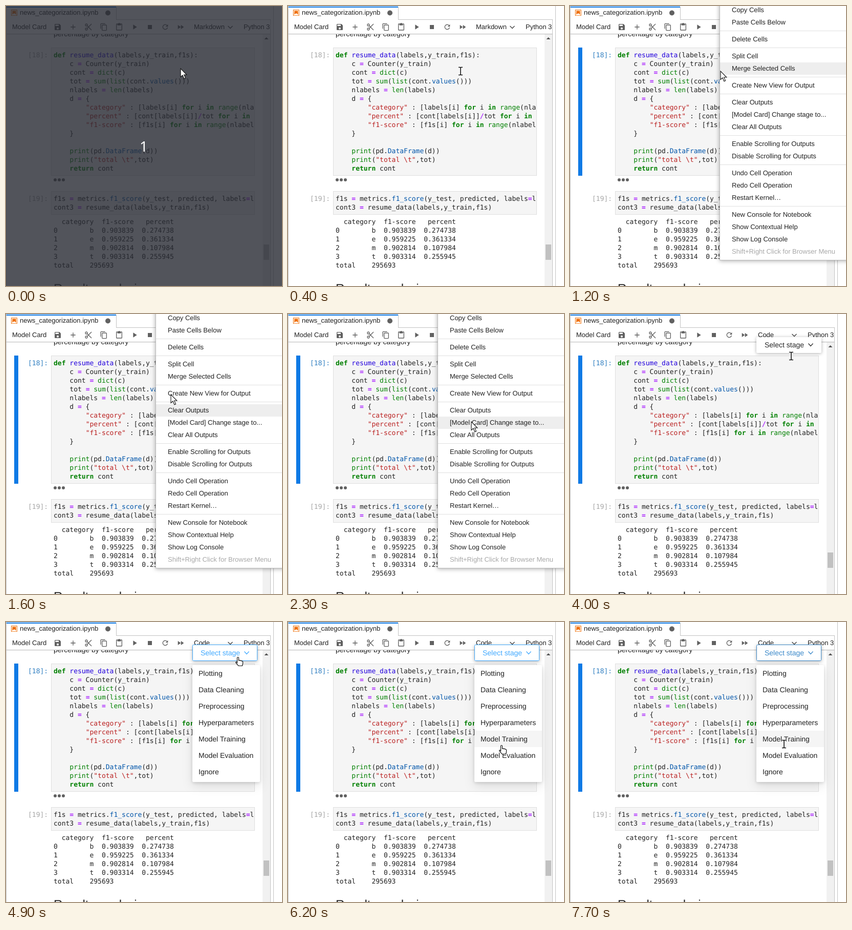
Write an HTML page that moves like this. It is 539 px wide and 546 px high and loops after 8 s.

```html
<!DOCTYPE html>
<html lang="en">
<head>
<meta charset="utf-8">
<title>Notebook cell stage</title>
<style>
html, body { margin: 0; width: 100%; height: 100%; overflow: hidden; background: #fff; }
svg { display: block; }
text { font: 13px "Liberation Sans", Arial, sans-serif; fill: #212121; white-space: pre; text-rendering: geometricPrecision; }
.mono text { font-family: "DejaVu Sans Mono", monospace; }
.big text, .md { font-size: 14px; }
.line { fill: #c2c2c2; }
.cell { fill: #f5f5f5; stroke: #dfdfdf; }
.icon { fill: #616161; }
.thin { fill: none; stroke: #616161; stroke-width: 2; }
.c0 { fill: #ba2121; }
.c1 { fill: #008000; font-weight: bold; }
.c2 { fill: #008000; }
.c3 { fill: #20d; }
.c4 { fill: #05a; }
.c5 { fill: #a2f; font-weight: bold; }
.mono .prompt { fill: #a6a6a6; }
.mono .active { fill: #307fc1; }
</style>
</head>
<body>
<svg id="stage" width="539" height="546" viewBox="0 0 539 546">
  <rect width="539" height="546" fill="#fff"/>

  <!-- notebook -->
  <text class="md" x="93" y="59">percentage by category</text>
  <rect id="bar" x="16" y="81" width="8" height="250" fill="#0f7ae5"/>
  <rect class="cell" x="88.5" y="81.5" width="397" height="249"/>
  <rect class="cell" x="88.5" y="361.5" width="397" height="45"/>
  <svg class="mono" id="code" width="485" height="546">
    <text class="prompt" id="prompt" x="43" y="100">[18]:</text>
    <text class="prompt" x="43" y="380">[19]:</text>
  </svg>
  <g class="icon"><circle cx="96" cy="339" r="3"/><circle cx="104" cy="339" r="3"/><circle cx="112" cy="339" r="3"/></g>
  <text x="93" y="558.5" style="font-size:24.2px">Results analysis</text>

  <!-- scrollbar -->
  <rect x="501" y="55" width="15" height="491" fill="#f1f1f1"/>
  <rect x="503" y="465" width="11" height="30" fill="#c1c1c1"/>
  <path d="M504.500 65l4-4 4 4z" fill="#505050"/>

  <!-- tab and toolbar -->
  <rect x="1" width="538" height="54" fill="#fff"/>
  <rect x="1" y="55" width="515" height="1" fill="#000" opacity=".06"/>
  <g class="line">
    <rect width="1" height="546"/>
    <rect x="215" y="2" width="1" height="25"/>
    <rect x="215" y="26" width="302" height="1"/>
    <rect y="54" width="517" height="1"/>
    <rect x="516" y="26" width="1" height="520"/>
    <rect x="522" width="1" height="546"/>
  </g>
  <rect x="1" y="1" width="214" height="2" fill="#0f7ae5"/>
  <g transform="translate(8.800 6) scale(.65)" fill="#ef6c00">
    <path d="M18.700 3.300v15.400H3.300V3.300zm1.500-1.500H1.800v18.300h18.400z" fill-rule="evenodd"/>
    <path d="M16.500 16.500l-5.400-4.300-5.600 4.300v-11h11z"/>
  </g>
  <text x="27" y="17">news_categorization.ipynb</text>
  <circle class="icon" cx="199" cy="13.500" r="5"/>
  <text x="12" y="45">Model Card</text>
  <g id="tools"></g>
  <text id="kind" x="367" y="44.500"></text>
  <path d="M433.500 39l4.500 4.500 4.500-4.500" fill="none" stroke="#424242" stroke-width="1.300"/>
  <text x="464" y="45">Python 3</text>

  <!-- context menu -->
  <g id="menu">
    <rect x="292.500" y="-20" width="300" height="515.500" fill="#fff" stroke="#bdbdbd" style="filter:drop-shadow(0 1px 4px rgba(0,0,0,.35))"/>
    <rect id="menuRow" x="293" width="246" height="24" fill="#eee"/>
  </g>

  <!-- stage picker -->
  <g id="drop" class="big">
    <rect x="364" y="84" width="132" height="228" rx="2" fill="#fff" style="filter:drop-shadow(0 2px 3px rgba(0,0,0,.14)) drop-shadow(0 7px 10px rgba(0,0,0,.1))"/>
    <rect id="dropRow" x="364" width="132" height="32" fill="#f5f5f5"/>
  </g>
  <g id="picker" class="big">
    <rect x="364" y="45" width="127" height="31" rx="2" fill="#fff" style="filter:drop-shadow(0 1px 3px rgba(0,0,0,.32))"/>
    <rect id="edge" x="364.500" y="44.500" width="126" height="31" rx="2" fill="#fff"/>
    <text id="label" x="380" y="65">Select stage</text>
    <path id="arrow" d="M465.500 57.500l4.500 5 4.500-5" fill="none" stroke-width="1.200"/>
  </g>

  <!-- countdown -->
  <g id="shade">
    <rect width="539" height="546" fill="rgb(39,42,51)" opacity=".8"/>
    <text x="269" y="284" text-anchor="middle" style="font:28px 'Noto Sans',sans-serif;fill:#fff">1</text>
  </g>

  <!-- pointers -->
  <path id="tip" d="M0 0v16.500l3.900-3.500 3 6.800 2.700-1.200-3-6.600h5.200z" fill="#fff" stroke="#111" stroke-width="1.100"/>
  <g id="beam" fill="none">
    <path d="M-4-7.500h3l1 1 1-1h3M0-6.500v13M-4 7.500h3l1-1 1 1h3" stroke="#fff" stroke-width="3.500"/>
    <path d="M-4-7.500h3l1 1 1-1h3M0-6.500v13M-4 7.500h3l1-1 1 1h3" stroke="#111" stroke-width="1.600"/>
  </g>
  <path id="hand" d="M-1.500 9V1a1.500 1.500 0 0 1 3 0v5q1.700-1 3 .5 1.600-.8 2.700.6 2-.3 2.300 1.400V12q0 2-1 3v1.500H1L-3.800 11q-1.200-1.800.3-2.200 1 0 2 1.600z" fill="#fff" stroke="#111" stroke-width="1.200"/>
</svg>
<script>
const $ = id => document.getElementById(id);
const add = (id, markup) => $(id).insertAdjacentHTML('beforeend', markup);
const text = (x, y, s, extra = '') => `<text x="${x}" y="${y}" ${extra}>${s}</text>`;
const clamp = v => Math.max(0, Math.min(1, v));
const show = (id, on) => $(id).style.display = on ? '' : 'none';

// Code and output
const syntax = /(".*?")|\b(def|for|in|return)\b|\b(dict|sum|list|len|range|print)\b|(?<=def )(\w+)|(?<=\.)(\w+)|([=\/])/g;
const paint = s => s.replace(syntax, (m, ...g) => `<tspan class="c${g.findIndex(Boolean)}">${m}</tspan>`);
const block = (y, s, style = v => v) =>
  s.split('\n').forEach((row, i) => add('code', text(93, y + 17 * i, style(row))));

block(100, String.raw`def resume_data(labels,y_train,f1s):
    c = Counter(y_train)
    cont = dict(c)
    tot = sum(list(cont.values()))
    nlabels = len(labels)
    d = {
        "category" : [labels[i] for i in range(nlabels)],
        "percent" : [cont[labels[i]]/tot for i in range(nlabels)],
        "f1-score" : [f1s[i] for i in range(nlabels)]
    }

    print(pd.DataFrame(d))
    print("total \t",tot)
    return cont`, paint);
block(380, `f1s = metrics.f1_score(y_test, predicted, labels=labels)
cont3 = resume_data(labels,y_train,f1s)`, paint);
block(425, `  category  f1-score   percent
0        b  0.903839  0.274738
1        e  0.959225  0.361334
2        m  0.902814  0.107984
3        t  0.903314  0.255945
total    295693`);

// Toolbar icons on a 24-unit grid
[
  '<path d="M17 3H5c-1.100 0-2 .9-2 2v14c0 1.100.9 2 2 2h14c1.100 0 2-.9 2-2V7zM12 19a3 3 0 1 1 0-6 3 3 0 0 1 0 6zM15 9H5V5h10z" fill-rule="evenodd"/>',
  '<path d="M19 13h-6v6h-2v-6H5v-2h6V5h2v6h6z"/>',
  '<path class="thin" d="M8 8l13 13M8 16L21 3"/><circle class="thin" cx="6" cy="6" r="3"/><circle class="thin" cx="6" cy="18" r="3"/>',
  '<path class="thin" d="M3 17V4q0-2 2-2h11M9 6h9q2 0 2 2v12q0 2-2 2H9q-2 0-2-2V8q0-2 2-2z"/>',
  '<path class="thin" d="M5 3h14q1 0 1 1v16q0 1-1 1H5q-1 0-1-1V4q0-1 1-1z"/><path d="M7 3h2a3 3 0 0 1 6 0h2v4H7z"/>',
  '<path d="M8 5v14l11-7z"/>',
  '<path d="M6 6h12v12H6z"/>',
  '<path class="thin" d="M17 7a7 7 0 1 0 1.700 6.500"/><path d="M20 4v7h-7z"/>',
  '<path d="M4 18l8.500-6L4 6zM13 6v12l8.500-6z"/>'
].forEach((d, i) => add('tools', `<g class="icon" transform="translate(${93 + 30 * i} 33) scale(.667)">${d}</g>`));

// Context menu: "-" is a separator
let y = 8;
for (const item of ['Copy Cells', 'Paste Cells Below', '-', 'Delete Cells', '-', 'Split Cell', 'Merge Selected Cells', '-',
  'Create New View for Output', '-', 'Clear Outputs', '[Model Card] Change stage to...', 'Clear All Outputs', '-',
  'Enable Scrolling for Outputs', 'Disable Scrolling for Outputs', '-', 'Undo Cell Operation', 'Redo Cell Operation',
  'Restart Kernel…', '-', 'New Console for Notebook', 'Show Contextual Help', 'Show Log Console',
  'Shift+Right Click for Browser Menu']) {
  if (item === '-') {
    add('menu', `<rect x="293" y="${y - 8}" width="246" height="1" fill="#e0e0e0"/>`);
    y += 9;
  } else {
    add('menu', text(316, y + 4, item, item.startsWith('Shift') ? 'style="fill:#a8a8a8"' : ''));
    y += 24;
  }
}

['Plotting', 'Data Cleaning', 'Preprocessing', 'Hyperparameters', 'Model Training', 'Model Evaluation', 'Ignore']
  .forEach((s, i) => add('drop', text(376, 105 + 32 * i, s)));

// Pointer path: time, x, y
const path = [
  [0, 341, 122], [399, 341, 122], [400, 337, 127], [500, 337, 127], [800, 294, 127], [1300, 294, 127],
  [1400, 297, 130], [1600, 322, 157], [1700, 338, 188], [1800, 338, 188], [1900, 351, 234], [2000, 357, 240],
  [2100, 360, 231], [2200, 360, 231], [2300, 358, 210], [3300, 358, 210], [3400, 353, 209], [3600, 351, 190],
  [3800, 392, 135], [4000, 432, 82], [4200, 436, 66], [4300, 436, 66], [5200, 462, 70], [5400, 480, 92],
  [5600, 472, 135], [5900, 432, 215], [6100, 417, 242], [6200, 417, 241], [6500, 417, 241], [6600, 417, 242],
  [6700, 417, 242], [6800, 417, 241], [7200, 417, 241], [7400, 418, 238], [8000, 418, 238]
];
function pointer(t) {
  const i = path.findIndex(k => k[0] > t);
  const [t0, x0, y0] = path[i - 1], [t1, x1, y1] = path[i];
  const p = (t - t0) / (t1 - t0);
  return [x0 + (x1 - x0) * p, y0 + (y1 - y0) * p];
}

function draw(t) {
  const [px, py] = pointer(t);
  const picked = t >= 1100;
  const menu = picked && t < 3100;
  const shape = t < 400 || menu ? 'tip' : t >= 4200 && t < 7400 ? 'hand' : 'beam';

  show('shade', t < 400);
  show('bar', picked);
  $('prompt').classList.toggle('active', picked);
  $('kind').textContent = picked ? 'Code' : 'Markdown';

  show('menu', menu);
  $('menuRow').setAttribute('y', t < 1400 ? 110 : t < 1600 ? 143 : t < 1700 ? 176 : t < 2100 ? 224 : 200);

  show('picker', t >= 3100);
  const blue = clamp((t - 4100) / 300) - .25 * clamp((t - 7300) / 400);
  const color = `rgb(${[64, 169, 255].map(c => 38 + (c - 38) * blue)})`;
  $('label').style.fill = color;
  $('arrow').style.stroke = color;
  $('edge').style.stroke = color;
  $('edge').style.opacity = clamp(blue * 1.3);

  const open = clamp((t - 4300) / 300);
  show('drop', open > 0);
  $('drop').style.opacity = open;
  $('drop').setAttribute('transform', `translate(0 84) scale(1 ${.8 + .2 * open}) translate(0 -84)`);
  show('dropRow', py >= 84);
  $('dropRow').setAttribute('y', 84 + 32 * Math.floor((py - 84) / 32));

  for (const id of ['tip', 'beam', 'hand']) show(id, id === shape);
  $(shape).setAttribute('transform', `translate(${Math.round(px)} ${Math.round(py)})`);
}

function tick() {
  draw(Math.floor(performance.now() % 8000 / 100) * 100);
  requestAnimationFrame(tick);
}
tick();
</script>
</body>
</html>
```
